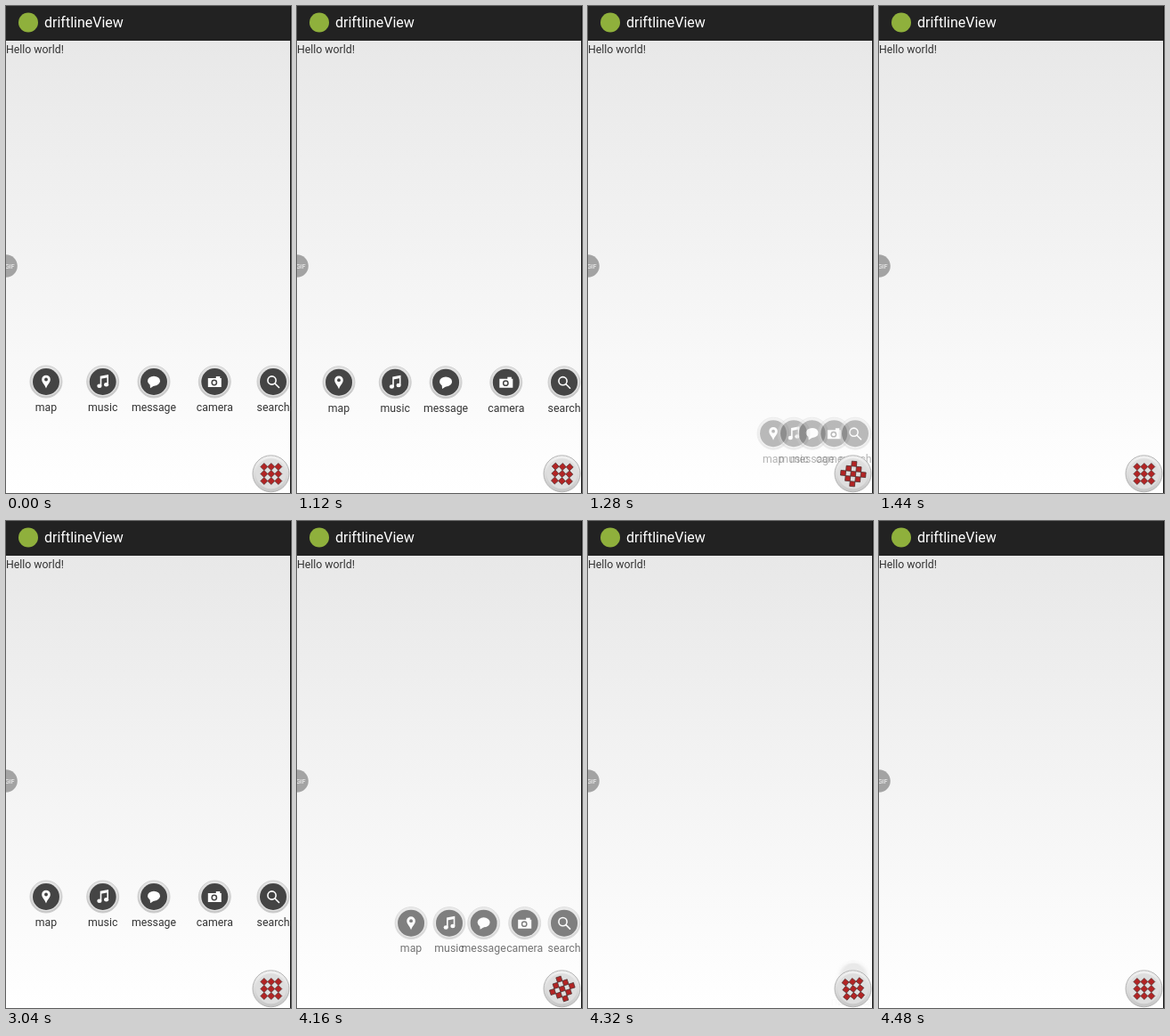
Recreate the animation shown at these times as an HTML page. Size 320 by 547 pixels, loop 4800 ms.

```html
<!DOCTYPE html>
<html lang="en">
<head>
<meta charset="utf-8">
<title>Fan-out menu</title>
<style>
  html, body { margin: 0; height: 100%; overflow: hidden; background: #fff; }
  svg { display: block; width: 100vw; height: 100vh; }
  text { font: 12.3px Roboto, sans-serif; fill: #333; }
  .title { font-size: 16px; fill: #fff; }
  .badge { font-size: 7px; fill: #fff; }
  .item text { text-anchor: middle; }
  .glyph { fill: #fff; }
  .hole { fill: #444; }
  .line { fill: none; stroke: #fff; stroke-width: 1.6; }
</style>
</head>
<body>
<svg viewBox="0 0 320 547">
  <defs>
    <linearGradient id="page" x2="0" y2="1">
      <stop stop-color="#e8e8e8"/><stop offset="1" stop-color="#fff"/>
    </linearGradient>
    <linearGradient id="rim" x2="0" y2="1">
      <stop stop-color="#e6e6e6"/><stop offset="1" stop-color="#c2c2c2"/>
    </linearGradient>
    <linearGradient id="knob" x2="0" y2="1">
      <stop stop-color="#f2f2f2"/><stop offset="1" stop-color="#c6c6c6"/>
    </linearGradient>
  </defs>
  <rect y="39" width="320" height="508" fill="url(#page)"/>
  <rect width="320" height="39" fill="#222"/>
  <circle cx="25" cy="18.5" r="11" fill="#8fb03c"/>
  <text class="title" x="43" y="24">driftlineView</text>
  <text x="0" y="53">Hello world!</text>
  <circle cx="0" cy="292" r="12.8" fill="#a3a3a3"/>
  <text class="badge" x="-1" y="294.6">GIF</text>
  <g id="items"></g>
  <circle cx="297.5" cy="525.3" r="20.5" fill="url(#knob)" stroke="#b4b4b4"/>
  <circle cx="297.5" cy="525.3" r="17" fill="#dedede"/>
  <g id="grid" fill="#b32424" stroke="#4a3030" stroke-width=".7"></g>
  <rect x="319" width="1" height="547" fill="#111"/>
</svg>
<script>
const LOOP = 4800, STEP = 160, DURATION = 300;
const ANCHOR_X = 300, OPEN_Y = 422, DROP = 91;
// Each tap starts opening or closing the menu.
const taps = [
  { at: -DURATION, open: true },
  { at: 1103, open: false },
  { at: 2714, open: true },
  { at: 4044, open: false },
];
const menu = [
  ['map', 45, `<path class="glyph" d="M0 7.5C-1.5 3-4.8 1-4.8-2.5a4.8 4.8 0 0 1 9.6 0C4.8 1 1.5 3 0 7.5z"/>
    <circle class="hole" cy="-2.5" r="1.9"/>`],
  ['music', 108.7, `<path class="line" d="M-2.2 4.5V-5.5L5.5-7V3M-2.2-4L5.5-5.5"/>
    <ellipse class="glyph" cx="-3.8" cy="4.8" rx="2.6" ry="2.2"/><ellipse class="glyph" cx="3.9" cy="3.3" rx="2.6" ry="2.2"/>`],
  ['message', 166, `<ellipse class="glyph" cy="-.8" rx="7" ry="5.5"/>
    <path class="glyph" d="M-4.5 2L-4 7.2L1 4z"/>`],
  ['camera', 234.3, `<path class="glyph" d="M-7.5-4H1.5V-6H6V-4H7.5V6H-7.5z"/>
    <circle class="hole" cx="-.5" cy="1" r="3.4"/><circle class="glyph" cx="-.5" cy="1" r="1.9"/>`],
  ['search', 300, `<circle class="line" cx="-1.5" cy="-1.5" r="4.6"/>
    <path class="line" stroke-linecap="round" d="M2 2L6.5 6.5"/>`],
];
const items = document.getElementById('items');
const grid = document.getElementById('grid');

items.innerHTML = menu.map(([label, , glyph]) => `<g class="item">
  <circle r="18" fill="url(#rim)" stroke="#cfcfcf"/>
  <circle r="16.2" fill="#e2e2e2"/><circle class="hole" r="15"/>
  ${glyph}<text y="32.8">${label}</text></g>`).join('');

for (const y of [-8, 0, 8])
  for (const x of [-8, 0, 8])
    grid.innerHTML += `<path d="M${x} ${y - 4}l4 4l-4 4l-4-4z"/>`;

function draw(now) {
  const time = Math.floor(now % LOOP / STEP) * STEP;
  const tap = taps.findLast(({ at }) => at <= time);
  const progress = (1 - Math.cos(Math.PI * Math.min(1, (time - tap.at) / DURATION))) / 2;
  const spread = tap.open ? progress : 1 - progress;
  const y = OPEN_Y + DROP * (1 - spread);

  menu.forEach(([, openX], i) => {
    const x = ANCHOR_X + (openX - ANCHOR_X) * spread;
    items.children[i].setAttribute('transform', `translate(${x} ${y})`);
  });
  for (const item of items.children) item.setAttribute('opacity', spread);
  grid.setAttribute('transform', `translate(297.8 525.5) rotate(${360 * progress})`);
}

const start = performance.now();
function tick() {
  draw(performance.now() - start);
  requestAnimationFrame(tick);
}
tick();
</script>
</body>
</html>
```
